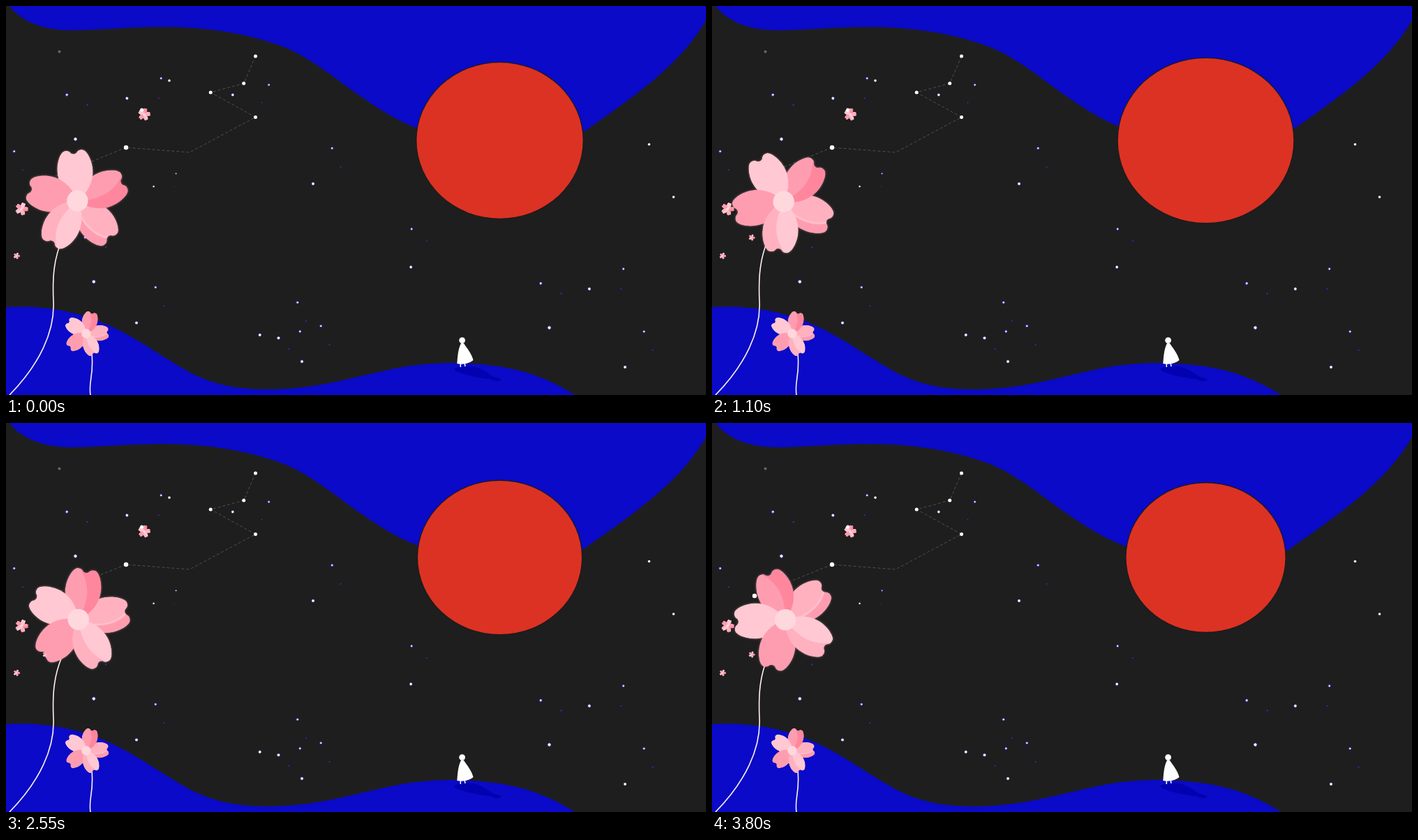
Recreate the animation shown at these times as an HTML page. Size 1003 by 558 pixels, loop 3900 ms.

```html
<!DOCTYPE html>
<html lang="en">
<head>
<meta charset="utf-8">
<title>Night garden</title>
<style>
  html, body { margin: 0; width: 100%; height: 100%; overflow: hidden; background: #1e1e1e; }
  svg { display: block; width: 100%; height: 100%; }
  .blue { fill: #0a0ac8; }
  .stem { fill: none; stroke: #fff1ee; stroke-width: 1.6; }
</style>
</head>
<body>
<svg viewBox="0 0 1003 558" preserveAspectRatio="none">
  <defs>
    <path id="petal" d="M0 0C-9-5-25-20-25.5-42C-26-54-21-66-17-70C-14-74-7-74-4-69C-2-67 2-67 4-69C7-74 14-74 17-70C21-66 26-54 25.5-42C25-20 9-5 0 0Z"/>
    <clipPath id="edge"><use href="#petal"/></clipPath>
    <filter id="halo" x="-20%" y="-20%" width="140%" height="140%">
      <feDropShadow dx="0" dy="0" stdDeviation="1.5" flood-color="#ffb3c0" flood-opacity=".5"/>
    </filter>
    <filter id="soft" x="-5%" y="-5%" width="110%" height="110%"><feGaussianBlur stdDeviation=".6"/></filter>
    <g id="flower"></g>
    <g id="trio">
      <circle r="2" fill="#3b39d0"/>
      <circle cx=".3" r="1.3" fill="#e4e2ff"/>
      <circle cx="12.5" cy="26.7" r="1" fill="#3532c4"/>
      <circle cx="-27" cy="51" r="2.3" fill="#6260c8"/>
      <circle cx="-27" cy="51" r="1.7" fill="#fff"/>
    </g>
  </defs>

  <rect width="1003" height="558" fill="#1e1e1e"/>
  <path class="blue" d="M5 0C24 24 55 35 97 35C140 34 180 30 222 30C290 30 350 40 400 59.500C435 74 468 101 500 124C532 146 555 162 588 175C660 212 770 222 830 179C900 130 968 83 1003 20V0Z"/>
  <path class="blue" d="M0 432C42 429 86 435 125 449C180 468 220 503 270 529C305 545 335 550 378 550C460 549 510 527 580 516C620 511 655 511 690 515C743 520 784 538 815 558H0Z"/>

  <g id="sky"></g>
  <g filter="url(#soft)">
    <ellipse id="rim" cx="707.5" cy="193" fill="#1c1a1c"/>
    <ellipse id="sun" cx="707.5" cy="193" fill="#dc3223"/>
  </g>

  <path d="M643 520C650 515 665 515 676 519C690 524 693 530 701 532.500C706 533 710 535 709 537C706 539 698 538 694 535C678 534 655 529 643 523Z" fill="#0202b0"/>
  <g fill="#fff">
    <circle cx="653.6" cy="479.6" r="4.4"/>
    <path d="M652 484H656C660 490 668 500 669.500 508C665 512 655 515 646.300 513C647 503 648 491 652 484Z"/>
    <path d="M651.300 512V518M656.700 510L658 517" stroke="#fff" stroke-width="1.5"/>
  </g>

  <g id="buds"></g>
  <path class="stem" d="M5 558C48 514 70 467 68 424C66.500 390 68 362 82 331C87 320 94 306 104 290"/>
  <path class="stem" d="M121 558C118 538 126 530 123 499"/>
  <use href="#flower" transform="translate(115 470) rotate(-57) scale(.44)"/>
  <g filter="url(#halo)"><use id="bloom" href="#flower"/></g>
</svg>
<script>
const $ = id => document.getElementById(id);
const TURN = 'M-11-75C4-58 14-38 0 0', FOLD = 'M-5-75C14-60 18-30 4 0';
const place = (id, x, y, turn, scale) =>
  `<use href="#${id}" transform="translate(${x} ${y}) rotate(${turn}) scale(${scale})"/>`;
const dot = ([x, y], r, fill = '#fff') => `<circle cx="${x}" cy="${y}" r="${r}" fill="${fill}"/>`;

// Clockwise, top petal of the stack first: base, shade, dividing curve, crease
const petals = [
  ['#ffc8d2', '#ffb1c0', TURN],
  ['#ff9db0'],
  ['#ffc8d2'],
  ['#ff9db0', '#ff879d', TURN],
  ['#ffb1c0', '#ff9db0', FOLD, '#ffbfca']
];
$('flower').innerHTML = petals.map(([base, shade, curve, crease], i) =>
  `<g transform="rotate(${(i - 2) * 72})"><g clip-path="url(#edge)"><use href="#petal" fill="${base}"/>` +
  (shade ? `<path d="${curve}H40V-80Z" fill="${shade}"/>` : '') +
  (crease ? `<path d="${curve}" fill="none" stroke="${crease}" stroke-width="3"/>` : '') +
  '</g></g>').reverse().join('') + '<circle r="15.2" fill="#ffd8de"/>';

// Every small star belongs to a copy of one trio, turned and scaled
const trios = [
  { turn: 0, scale: 1, at: [[11.5, 208.5], [467, 204], [214, 403.5], [417.5, 425.3], [451, 459], [914, 467]] },
  { turn: -39, scale: 1.12, at: [[87, 127.5], [766, 398], [113.3, 332]] },
  { turn: 31.5, scale: .98, at: [[222, 103.6], [884.5, 377]] },
  { turn: 46.5, scale: .93, at: [[376.5, 113]] },
  { turn: 57, scale: 1, at: [[421.2, 466.7]] },
  { turn: -27, scale: .944, at: [[581, 320]] },
  { turn: 32, scale: .64, at: [[243.5, 240.3]] }
];
const chain = [[357.5, 72], [340.7, 111], [293.2, 124], [357.5, 159.5], [263, 210], [172, 203], [61, 248]];
const loose = [[234, 107], [921.5, 198.5], [956.5, 274]];

$('sky').innerHTML =
  `<polyline points="${chain.join(' ')}" fill="none" stroke="#555" stroke-width=".9" stroke-dasharray="4 3"/>` +
  chain.slice(0, 4).map(p => dot(p, 2.5)).join('') +
  chain.slice(5).map(p => dot(p, 3.2)).join('') +
  trios.map(({ turn, scale, at }) => at.map(([x, y]) => place('trio', x, y, turn, scale)).join('')).join('') +
  loose.map(p => dot(p, 1.8)).join('') + dot([76.5, 65.5], 2, '#666');

$('buds').innerHTML =
  place('flower', 198, 155.5, -60, .125) + place('flower', 22.5, 291, 20, .13) +
  place('flower', 15.3, 358.4, 20, .066) + place('flower', 57, 332, 20, .066) +
  dot([194.6, 149], 2.5);

const LOOP = 3900, STEP = 84.4, LAST = 45;
const PEAK = 1130, HALF = 2320;

function pose(t) {
  // The sun swells and shrinks at a constant rate
  const swing = Math.abs(t - PEAK);
  const rx = 126.2 - .0061 * Math.min(swing, 2 * HALF - swing);
  for (const [id, pad] of [['sun', -.2], ['rim', 1.1]]) {
    $(id).setAttribute('rx', rx + pad);
    $(id).setAttribute('ry', rx * .9375 + pad);
  }
  // The bloom makes a quarter turn about a point just off its centre
  $('bloom').setAttribute('transform',
    `translate(105.2 279.5) rotate(${-90 * t / LOOP}) translate(-2.8 0) rotate(-4.6)`);
}

const start = performance.now();
function tick(now) {
  const t = Math.max(0, now - start) % LOOP;
  pose(STEP * Math.min(LAST, Math.floor((t + 30) / STEP)));
  requestAnimationFrame(tick);
}
pose(0);
requestAnimationFrame(tick);
</script>
</body>
</html>
```
